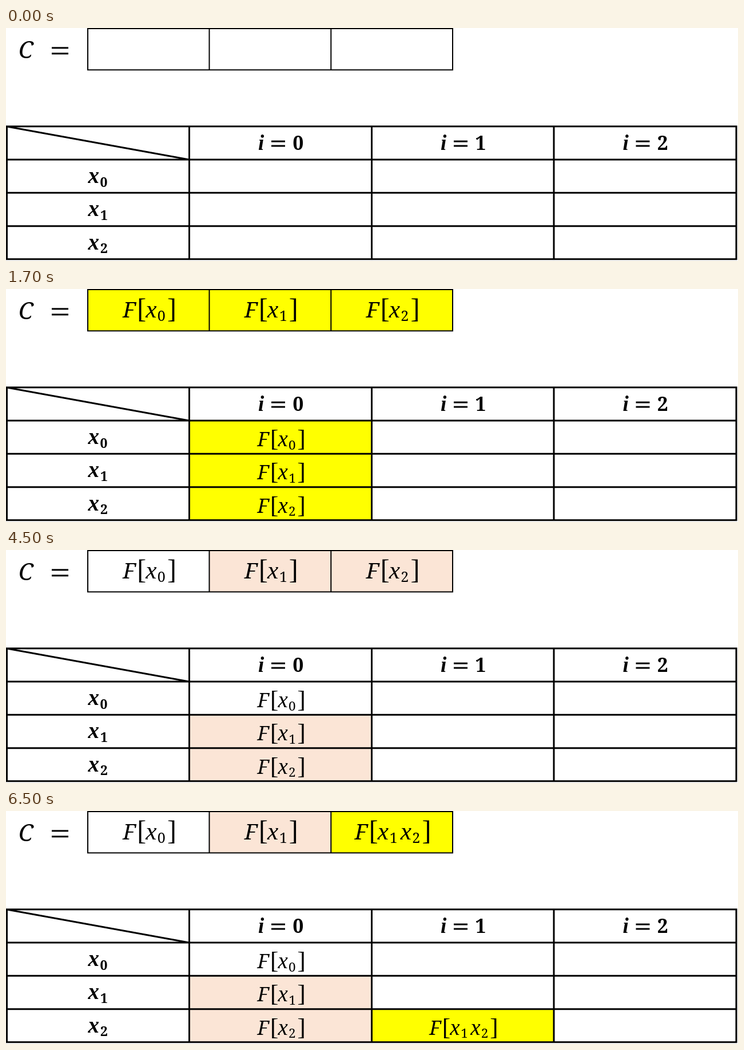
Animation, 1280 px wide and 409 px high, one loop 8000 ms. Source, as an HTML page with a canvas:

```html
<!DOCTYPE html>
<html lang="en">
<head>
<meta charset="utf-8">
<title>Divided differences</title>
<style>
  html, body { margin: 0; width: 100%; height: 100%; overflow: hidden; background: #fff; }
  canvas { display: block; }
</style>
</head>
<body>
<canvas id="stage" width="1280" height="409"></canvas>
<script>
const ctx = document.getElementById('stage').getContext('2d');
const SERIF = '"Noto Serif", serif';
const TIMES = '"Liberation Serif", serif';
const YELLOW = '#ffff00', PEACH = '#fbe5d6';
const LOOP = 8000, CUTS = [500, 2500, 4500, 6500];
const colX = [1.5, 320.5, 639.5, 958, 1277];
const rowY = [172.8, 231, 289.3, 347.7, 405.7];
const boxX = [143, 355.5, 568.3, 781];

// Draws one glyph with its ink centred on x.
function glyph(ch, x, y, size, style, family = SERIF) {
  ctx.font = `${style} ${size}px ${family}`;
  const m = ctx.measureText(ch);
  ctx.fillText(ch, x + (m.actualBoundingBoxLeft - m.actualBoundingBoxRight) / 2, y);
}

function lines(width, ...segments) {
  ctx.lineWidth = width;
  ctx.beginPath();
  for (const [x1, y1, x2, y2] of segments) {
    ctx.moveTo(x1, y1);
    ctx.lineTo(x2, y2);
  }
  ctx.stroke();
}

function equals(x, y, w, gap, h) {
  ctx.fillRect(x, y, w, h);
  ctx.fillRect(x, y + gap, w, h);
}

// F[x_a x_b ...] centred on cx with its baseline at y.
function term(subs, cx, y, k = 1) {
  ctx.save();
  ctx.translate(cx, y);
  ctx.scale(k, k);
  ctx.translate(-(45 + 36 * subs.length) / 2, 0);
  glyph('F', 11, 0, 34, 'italic');
  glyph('[', 31, 0, 43, 'normal', TIMES);
  [...subs].forEach((d, n) => {
    glyph('x', 45 + 36 * n, 0, 39, 'italic', TIMES);
    glyph(d, 61.5 + 36 * n, 5.5, 22.5, 'normal');
  });
  glyph(']', 41 + 36 * subs.length, 0, 43, 'normal', TIMES);
  ctx.restore();
}

function boxCell(n, fill, subs) {
  ctx.fillStyle = fill;
  ctx.fillRect(boxX[n], 1, boxX[n + 1] - boxX[n], 72.5);
  ctx.fillStyle = '#000';
  if (subs) term(subs, (boxX[n] + boxX[n + 1]) / 2 - 0.5, 50, 1.11);
}

function tableCell(col, row, fill, subs) {
  ctx.fillStyle = fill;
  ctx.fillRect(colX[col], rowY[row], colX[col + 1] - colX[col], rowY[row + 1] - rowY[row]);
  ctx.fillStyle = '#000';
  term(subs, (colX[col] + colX[col + 1]) / 2 - 0.5, rowY[row] + 45);
}

function frame() {
  ctx.fillStyle = '#000';
  ctx.strokeStyle = '#000';
  glyph('C', 36.5, 53, 41, 'italic');
  equals(80, 33.4, 29, 10, 3);

  lines(2, ...boxX.map(x => [x, 0, x, 74.5]), [142, 1, 782, 1], [142, 73.5, 782, 73.5]);
  lines(3, ...colX.map(x => [x, 171.3, x, 407.2]), ...rowY.map(y => [0, y, 1278.5, y]),
    [2, 173, 320, 231]);

  for (let n = 0; n < 3; n++) {
    const x = colX[n + 1], y = rowY[n + 1];
    glyph('i', x + 126, 213.5, 37, 'italic bold', TIMES);
    equals(x + 143.5, 197.5, 24, 8, 3);
    glyph(n, x + 190.5, 213.5, 33.5, 'bold');
    glyph('x', 152.5, y + 41, 39, 'italic bold', TIMES);
    glyph(n, 171, y + 47.5, 23, 'bold');
  }
}

function draw(step) {
  ctx.fillStyle = '#fff';
  ctx.fillRect(0, 0, 1280, 409);
  for (let n = 0; n < 3 && step > 0; n++) {
    const fill = step === 1 ? YELLOW : step > 2 && n > 0 ? PEACH : '#fff';
    const merged = step === 4 && n === 2;
    boxCell(n, merged ? YELLOW : fill, merged ? '12' : String(n));
    tableCell(1, n + 1, fill, String(n));
  }
  if (step === 4) tableCell(2, 3, YELLOW, '12');
  frame();
}

function tick(now) {
  const t = now % LOOP;
  draw(CUTS.filter(cut => t >= cut).length);
  requestAnimationFrame(tick);
}

const start = performance.now();
requestAnimationFrame(function run() {
  tick(Math.max(0, performance.now() - start));
});
</script>
</body>
</html>
```
